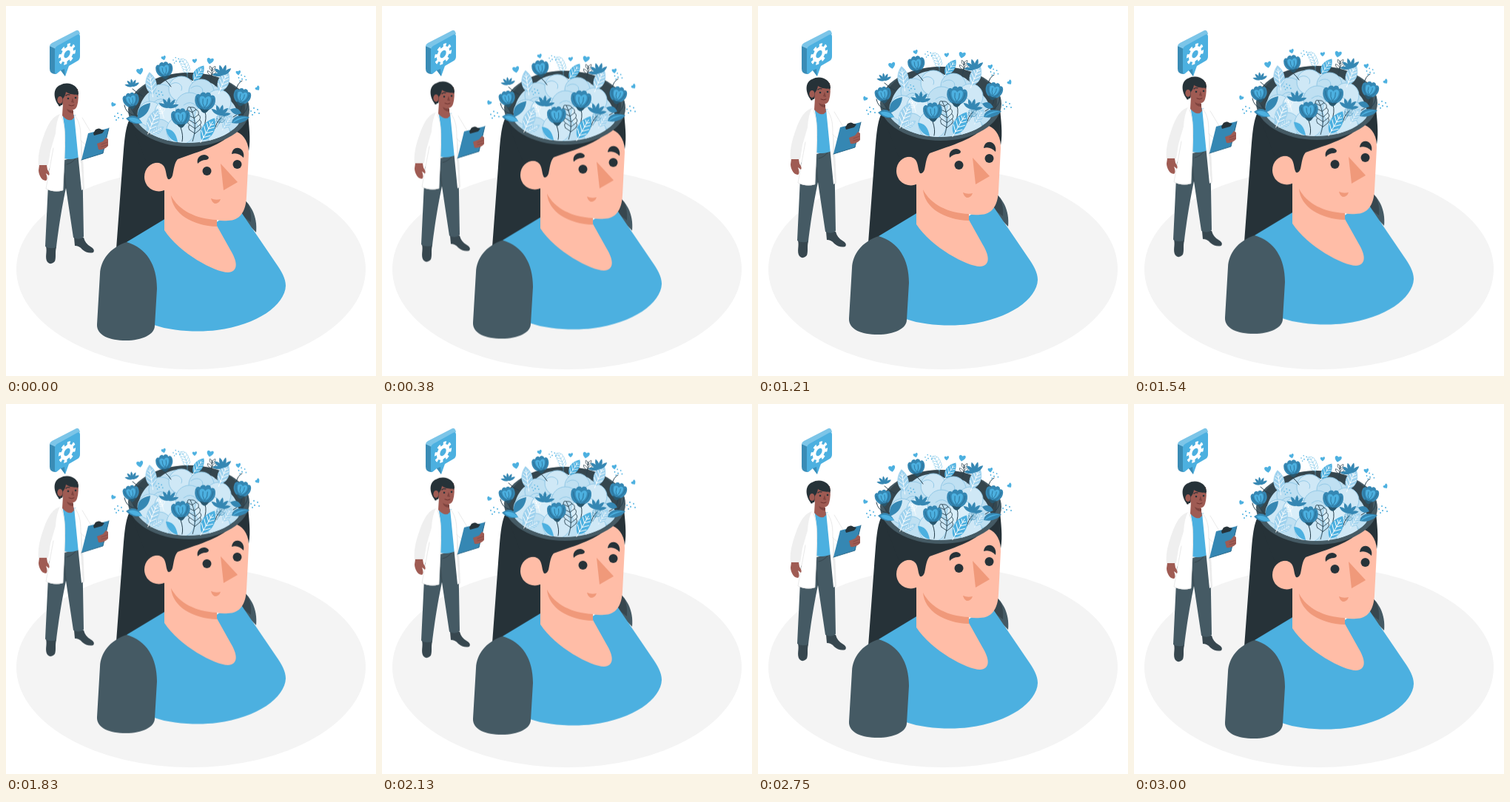
An HTML page for the animation above (3.04 s loop, 500 by 500 pixels).

```html
<!DOCTYPE html>
<html lang="en">
<head>
<meta charset="utf-8">
<title>Mind garden</title>
<style>
html, body { margin: 0; height: 100%; overflow: hidden; background: #fff; }
svg { display: block; width: 100%; height: 100%; }
.float { animation: float 3040ms linear infinite; }
@keyframes float {
  0% { transform: translateY(0); }
  48.03% { transform: translateY(-9.7px); }
  97.37% { transform: translateY(.27px); }
  100% { transform: translateY(-.2px); }
}
.line { fill: none; stroke-linecap: round; stroke-linejoin: round; }
.ink { fill: #263238; }
.slate { fill: #455a64; }
.blue { fill: #4cb0e0; }
.deep { fill: #3587b3; }
.skin { fill: #ffbda7; }
.blush { fill: #f0997a; }
.brown { fill: #9f5b53; }
</style>
</head>
<body>
<svg viewBox="0 0 500 500">
<defs>
  <g id="peony">
    <path class="deep" d="M0 12C-8 12-14 4-13-3C-13-8-9-10-7-8C-6-12-1-13 0-10C2-13 7-12 7-8C10-10 13-7 13-3C14 4 8 12 0 12Z"/>
    <path class="blue" d="M0 8C-6 6-8-1-7-5C-4-8-1-6 0-4C2-7 5-8 7-5C8-1 6 6 0 8Z"/>
    <path class="line" stroke="#276b90" stroke-width=".8" d="M-10-4C-10 3-6 8 0 11C6 8 10 3 10-4M-3-3Q-4 3 0 8Q4 3 3-3"/>
    <path fill="#28566d" d="M-6 9Q0 12 6 9Q4 14 0 15Q-4 14-6 9Z"/>
  </g>
  <path id="petal" d="M0 8C-4 2-3-5 0-9C3-5 4 2 0 8Z"/>
  <g id="fan" class="deep">
    <use href="#petal" transform="rotate(-68 0 8)"/><use href="#petal" transform="rotate(68 0 8)"/>
    <use href="#petal" transform="rotate(-34 0 8)"/><use href="#petal" transform="rotate(34 0 8)"/>
    <use href="#petal"/>
  </g>
  <g id="leaf">
    <path d="M0 15C-11 7-9-7 0-16C9-7 11 7 0 15Z"/>
    <path class="line" stroke="#fff" stroke-width=".8" d="M0 18V-11M0 11L-6 5M0 11L6 5M0 5L-6-1M0 5L6-1M0-1L-5-6M0-1L5-6M0-6L-3-9M0-6L3-9"/>
  </g>
  <g id="fern" class="line" stroke-width=".9">
    <path d="M0 26C5 10 3-8-5-22M3 15L-5 10M3 15L10 9M3 8L-5 3M3 8L10 2M3 1L-6-4M3 1L9-5M1-7L-8-11M1-7L7-12M-2-15L-9-18M-2-15L3-19"/>
    <path d="M-5 10Q-8 5-5 3Q-10 0-6-4Q-11-8-8-11Q-13-16-9-18Q-9-24-5-22Q2-23 3-19Q8-18 7-12Q11-10 9-5Q13-1 10 2Q13 6 10 9"/>
  </g>
  <g id="sprig" class="line" stroke-width=".9">
    <path d="M0 14Q2 2-1-9M1 5Q-7 5-8-2Q-1-2 1 5ZM1 3Q2-5 8-5Q8 2 1 3ZM0-3Q-6-5-5-11Q1-9 0-3ZM0-4Q0-11 5-12Q6-6 0-4Z"/>
  </g>
  <path id="heart" class="blue" d="M0 5C-8 0-5-6 0-2.5C4-7 8-1 0 5Z"/>
  <g id="dots" class="blue">
    <circle cx="-5" r="1"/><circle cx="-1" cy="-4" r="1"/><circle cx="0" cy="2" r="1.1"/>
    <circle cx="4" cy="-2" r="1"/><circle cx="6" cy="3" r="1"/><circle cx="-3" cy="5" r="1"/>
  </g>
  <clipPath id="bowl"><path d="M160 60H340V139H322C322 165 288 185 247 185S172 165 172 139H160Z"/></clipPath>
</defs>

<ellipse cx="250" cy="355.5" rx="236" ry="135.5" fill="#f4f4f4"/>

<!-- speech bubble -->
<path fill="#3a8cb6" d="M59 54L67 57V92Q59 92 59 85Z"/>
<path fill="#7cc5e8" d="M59 54Q59 52 62 50L95 33Q99 32 100 38L67 58Z"/>
<path class="blue" d="M66 59Q66 56 69 54L96 39Q100 37 100 41V68Q100 72 97 74L85 81L80 95L74 87L68 92Q66 92 66 89Z"/>
<path fill="#3a8cb6" d="M74 87L80 95L79 85Z"/>
<g class="line" stroke="#fff" transform="matrix(.87 -.46 0 1 82.5 65)">
  <circle r="7.3" stroke-width="5"/>
  <circle r="11" stroke-width="4.6" stroke-dasharray="4.32" style="stroke-linecap:butt"/>
</g>

<g class="float">
  <!-- doctor -->
  <g>
    <path fill="#37474f" d="M54 325C56 332 52 340 56 346Q61 351 66 345C68 339 66 333 68 326Z"/>
    <path fill="#37474f" d="M92 313L93 324Q99 324 103 329Q110 335 118 333Q121 329 114 325Q107 321 105 313Z"/>
    <path class="slate" d="M58 220L79 208L103 202L105 312Q99 317 91 313L81 246C74 280 71 302 68 326Q60 329 53 325Z"/>
    <path class="line" stroke="#37474f" stroke-width="1" d="M81 246L79 226M82 214Q90 212 94 206"/>
    <path class="blue" d="M76 147L94 147C101 158 102 180 101 203Q90 209 78 206Z"/>
    <path fill="#fff" d="M76 146C66 150 65 165 64 190L54 247Q66 253 77 249L80 190C80 170 79 158 76 146Z"/>
    <path class="line" stroke="#e4e4e4" stroke-width=".8" d="M75 149C82 166 79 184 79 204L77 249Q65 252 54 247L64 192"/>
    <path fill="#fff" d="M92 147C102 149 106 156 110 166L121 180L115 193L101 181L101 202L105 247L102 249Z"/>
    <path fill="#ececec" d="M101 181L101 207L104 249L106 247Q105 215 102 181Z"/>
    <path class="line" stroke="#e4e4e4" stroke-width=".8" d="M93 148C101 158 101 170 101 182L113 192M103 151L118 176"/>
    <path fill="#efefef" d="M73 146C60 150 54 165 47 188C44 198 43 208 44 216Q51 219 57 215L60 196L67 172Q68 155 73 146Z"/>
    <path class="brown" d="M45 215L55 215L56 221Q60 227 58 229L54 226Q57 234 54 236C47 236 44 226 44 222Z"/>
    <path class="brown" d="M77 132L90 138L92 151Q86 159 76 148Z"/>
    <path fill="#7e443f" d="M82 139Q87 142 91 141L91 145Q84 145 82 139Z"/>
    <path class="brown" d="M75 113L97 112Q99 125 96 135Q94 142 86 140Q79 138 76 132Z"/>
    <path class="ink" d="M71 134C64 125 63 111 73 107C83 101 98 106 98 119Q88 121 81 116Q80 122 77 125L76 134Z"/>
    <ellipse class="brown" cx="73" cy="127" rx="3.6" ry="5"/>
    <circle class="ink" cx="72.5" cy="134" r="1.6"/>
    <circle class="ink" cx="84" cy="125" r="1.3"/><circle class="ink" cx="94" cy="124" r="1.3"/>
    <path class="line" stroke="#263238" stroke-width="1.2" d="M81 121Q83 119 86 120M92 119Q95 118 97 120"/>
    <path fill="#7e443f" d="M90 124L92 131L88 130Z"/>
    <path class="line" stroke="#6a302d" stroke-width="1" d="M85 134Q89 136 92 134"/>
    <path class="deep" d="M111 172L139 165L131 199L102 208Z"/>
    <path class="line" stroke="#28688a" stroke-width="1" d="M139 165L131 199L102 208"/>
    <path class="ink" d="M118 172L121 167Q126 164 129 167L133 168L130 172L119 175Z"/>
    <path class="brown" d="M123 186L131 183L135 178L138 180L138 189Q133 195 125 194Z"/>
    <path class="line" stroke="#7e443f" stroke-width=".7" d="M129 187L137 184M129 190L137 188"/>
  </g>

  <!-- woman -->
  <path class="ink" d="M170 148C160 162 160 185 157 220L149 328L217 290V180Z"/>
  <path class="slate" d="M314 256C331 266 340 284 338 306L312 280Z"/>
  <path fill="#37474f" d="M318 258C328 265 332 275 331 292L312 278Z"/>
  <path class="blue" d="M216 287L163 319L200 431C225 440 262 441 285 438C340 431 377 404 378 378C378 368 372 358 365 348L314 273L280 295Z"/>
  <path class="skin" d="M214 190L312 160C324 170 328 185 328 200L325 258C324 278 316 290 300 290Q292 291 285 289V297L304 331C314 348 313 359 300 360C283 360 234 334 214 303Z"/>
  <path class="blush" d="M223 256C233 276 257 288 285 289V298C252 297 225 281 223 256Z"/>
  <path class="skin" d="M216 215C203 207 187 215 187 231C187 246 203 255 216 248Z"/>
  <path class="ink" d="M166 150L190 212Q207 209 213 216C217 222 216 230 219 234Q223 235 225 229C227 221 227 213 232 207C262 196 293 188 308 169C319 171 327 181 328 196C331 180 328 160 327 146Z"/>
  <path class="blush" d="M290 213L294 249L313 238Z"/>
  <path class="blush" d="M277 260Q283 263 290 261Q288 267 282 267Q278 265 277 260Z"/>
  <circle class="ink" cx="271.5" cy="223" r="6"/><circle class="ink" cx="312.5" cy="214" r="6"/>
  <path class="ink" d="M259 213C257 205 263 201 268 201C275 202 276 207 270 208Q264 208 259 213Z"/>
  <path class="ink" d="M305 200C306 192 312 190 317 193C321 196 322 201 321 205C316 200 311 198 305 200Z"/>
  <path class="slate" d="M163 319C140 327 128 343 127 362L123 430C122 445 140 452 162 452S201 444 201 432L204 382C204 350 190 327 163 319Z"/>

  <!-- open head -->
  <ellipse class="slate" cx="247" cy="140" rx="82" ry="50"/>
  <ellipse class="ink" cx="247" cy="137" rx="76" ry="47" opacity=".5"/>
  <g clip-path="url(#bowl)" fill="#bfe0f2" stroke="#91c8e6" stroke-width="1">
    <path stroke="none" d="M178 160C176 135 188 115 203 112C216 94 240 92 252 101C272 97 289 108 292 121C310 128 316 145 314 160L290 190H205Z"/>
    <circle cx="210" cy="123" r="17"/><circle cx="237" cy="112" r="17" fill="#cfe8f6"/>
    <circle cx="264" cy="116" r="17"/><circle cx="287" cy="130" r="17" fill="#cfe8f6"/>
    <circle cx="195" cy="146" r="17" fill="#cfe8f6"/><circle cx="218" cy="144" r="17" fill="#d9eef9"/>
    <circle cx="248" cy="136" r="19"/><circle cx="274" cy="150" r="19" fill="#d9eef9"/>
    <circle cx="300" cy="154" r="15"/><circle cx="207" cy="170" r="17"/>
    <circle cx="236" cy="168" r="19" fill="#cfe8f6"/><circle cx="287" cy="172" r="16" fill="#cfe8f6"/>
    <path class="line" d="M221 108C227 99 241 105 237 114M250 111C258 104 269 110 265 118M200 130Q209 121 218 130M240 134Q250 126 258 136M284 150Q292 143 300 151"/>
  </g>

  <!-- stems -->
  <g class="line" stroke="#263f4d" stroke-width="1">
    <path d="M169 138Q172 146 180 150M160 134Q162 145 173 148M319 134Q318 145 307 150M327 132Q326 144 315 150M236 164Q240 175 238 183M269 143Q272 152 267 164M290 151Q284 158 282 166M214 99Q220 104 223 109M290 95Q286 104 283 108M171 112Q178 119 185 122M311 113Q313 104 319 101"/>
  </g>

  <!-- leaves -->
  <g fill="#9fd2ee">
    <use href="#leaf" transform="translate(196 105) rotate(-8)"/>
    <use href="#leaf" transform="translate(294 102) rotate(22)"/>
    <use href="#leaf" transform="translate(199 155) rotate(22) scale(1.08)"/>
    <use href="#leaf" transform="translate(299 157) rotate(32) scale(.7)"/>
    <use href="#leaf" transform="translate(205 168) rotate(60) scale(.6)"/>
  </g>
  <g class="blue">
    <use href="#leaf" transform="translate(260 91) rotate(35) scale(.8)"/>
    <use href="#leaf" transform="translate(273 167) rotate(30) scale(1.12)"/>
    <path d="M216 166Q229 166 232 184Q219 181 216 166Z"/>
  </g>
  <g class="deep">
    <path d="M162 152Q175 142 184 158Q171 162 162 152ZM178 147Q178 134 195 131Q194 147 178 153Z"/>
    <path d="M305 158Q307 144 329 150Q321 161 305 158ZM303 140Q313 134 318 145Q309 150 303 140Z"/>
  </g>
  <path class="blue" d="M165 152Q176 148 184 158Q173 160 165 152ZM306 158Q312 149 327 150Q316 152 306 158Z"/>
  <use href="#fern" stroke="#263f4d" transform="translate(253 158) rotate(2) scale(.95)"/>
  <use href="#fern" stroke="#6bbde5" transform="translate(242 83) rotate(-12) scale(.55)"/>
  <use href="#sprig" stroke="#263f4d" transform="translate(278 90) rotate(8) scale(.75)"/>
  <use href="#sprig" stroke="#4b93b8" transform="translate(289 155) rotate(25) scale(.7)"/>
  <use href="#sprig" stroke="#fff" transform="translate(210 142) rotate(-20) scale(.7)"/>

  <!-- flowers -->
  <use href="#peony" transform="translate(214 86) rotate(-8) scale(.88)"/>
  <use href="#peony" transform="translate(169 127) rotate(-12) scale(.84)"/>
  <use href="#peony" transform="translate(319 122) rotate(14) scale(.9)"/>
  <use href="#peony" transform="translate(269 129) rotate(4) scale(1.06)"/>
  <use href="#peony" transform="translate(236 150) rotate(-4) scale(.98)"/>
  <use href="#fan" transform="translate(220 131) rotate(4) scale(.85)"/>
  <use href="#fan" transform="translate(291 141) rotate(14) scale(.85)"/>
  <use href="#fan" transform="translate(291 87) rotate(-18) scale(.85)"/>
  <use href="#fan" transform="translate(170 104) rotate(-8) scale(.62)"/>

  <use href="#heart" transform="translate(181 88) rotate(-8) scale(.95)"/>
  <use href="#heart" transform="translate(213 70) rotate(-15) scale(.65)"/>
  <use href="#heart" transform="translate(255 74) scale(.65)"/>
  <use href="#heart" transform="translate(276 74) rotate(15) scale(.95)"/>
  <use href="#heart" transform="translate(314 90) rotate(-5) scale(.68)"/>
  <use href="#heart" transform="translate(340 111) rotate(-35) scale(.65)"/>
  <use href="#heart" transform="translate(145 133) rotate(30) scale(.65)"/>
  <use href="#dots" transform="translate(230 73) scale(.8)"/>
  <use href="#dots" transform="translate(319 97) scale(.9)"/>
  <use href="#dots" transform="translate(152 149)"/>
  <use href="#dots" transform="translate(336 142)"/>
  <use href="#dots" transform="translate(207 118) scale(.8)"/>
</g>
</svg>
</body>
</html>
```
